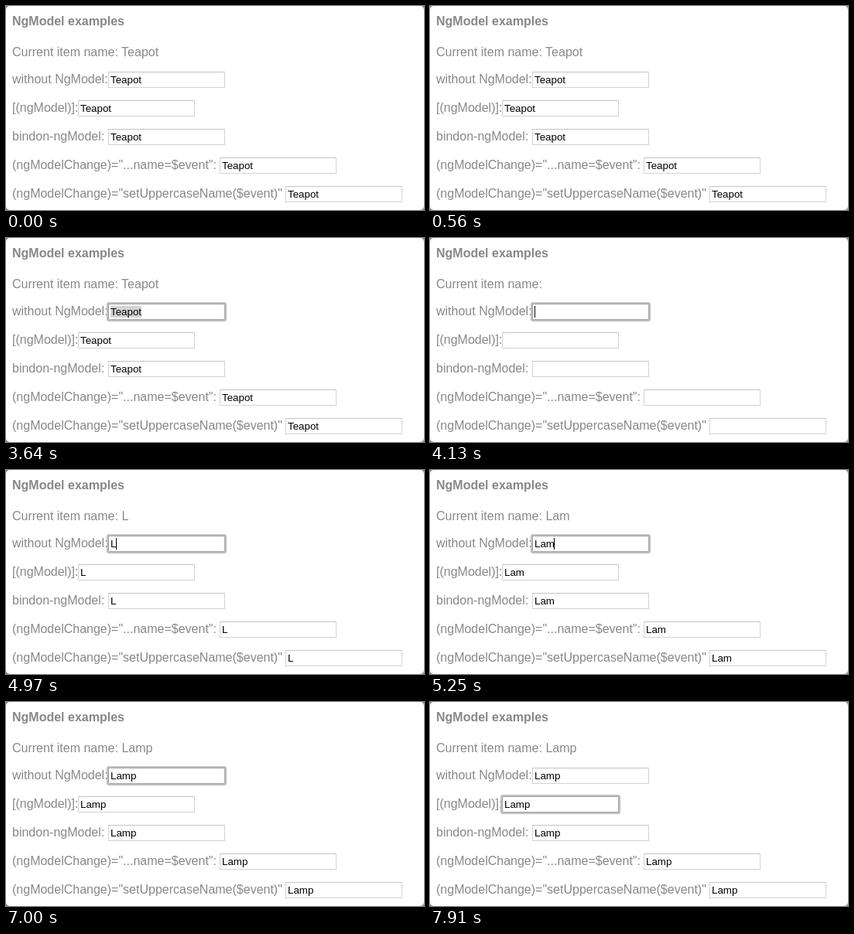
An HTML page that plays this animation: 540x264 px, repeating every 8000 ms.

```html
<!DOCTYPE html>
<html lang="en">
<head>
<meta charset="utf-8">
<title>NgModel examples</title>
<style>
html, body { margin: 0; height: 100%; overflow: hidden; background: #8a8a8a; }
#stage { position: relative; width: 540px; height: 264px; background: #fff; border-radius: 5px; }
#stage * { position: absolute; white-space: pre; }
.label { left: 8px; font: 16px/18px "Liberation Sans", Arial, sans-serif; color: #888; }
.title { font-weight: bold; }
.box { box-sizing: border-box; width: 151px; height: 21px; border: 1px solid #d2d2d2; border-top-color: #c4c4c4; background: #fff; }
.focus { border-color: #a6a6a6; box-shadow: 0 0 1px 2px #bdbdbd; border-radius: 1px; }
.value { left: 2px; top: 2px; font: 13.333px/15px "Liberation Sans", Arial, sans-serif; color: #000; }
.selected { background: #d4d4d4; }
.caret { top: 2px; width: 1px; height: 15px; background: #000; }
</style>
</head>
<body>
<div id="stage"></div>
<script>
const LOOP = 8000;
const stage = document.getElementById('stage');

// [label, left edge of its input]
const rows = [
  ['without NgModel:', 132],
  ['[(ngModel)]:', 93],
  ['bindon-ngModel:', 132],
  ['(ngModelChange)="...name=$event":', 276],
  ['(ngModelChange)="setUppercaseName($event)"', 361]
];

// [start time, value]
const values = [[0, 'Teapot'], [3990, ''], [4970, 'L'], [5110, 'La'], [5250, 'Lam'], [5460, 'Lamp']];
// [start time, focused row]
const focus = [[0, -1], [2450, 0], [7210, 1]];
// [start time, caret shown]
const blink = [[0, 0], [2450, 1], [2940, 0], [3500, 1], [3640, 0], [3990, 1], [4620, 0],
  [4970, 1], [5950, 0], [6510, 1], [7000, 0], [7210, 1], [7770, 0]];
const selection = [[0, 0], [3640, 1], [3990, 0]];

const at = (steps, t) => steps.filter(s => s[0] <= t).pop()[1];

function add(parent, cls, top, text = '') {
  const el = document.createElement('div');
  el.className = cls;
  if (top !== null) el.style.top = top + 'px';
  el.textContent = text;
  return parent.appendChild(el);
}

add(stage, 'label title', 11, 'NgModel examples');
const current = add(stage, 'label', 51);

const inputs = rows.map(([label, left], i) => {
  const y = 85 + 37 * i;
  add(stage, 'label', y + 1, label);
  const box = add(stage, 'box', y);
  box.style.left = left + 'px';
  return { box, value: add(box, 'value', null), caret: add(box, 'caret', null) };
});

function draw(now) {
  const t = now % LOOP;
  const name = at(values, t), active = at(focus, t);
  current.textContent = 'Current item name: ' + name;
  inputs.forEach(({ box, value, caret }, i) => {
    const on = i === active;
    box.classList.toggle('focus', on);
    value.textContent = name;
    value.classList.toggle('selected', on && at(selection, t) === 1);
    caret.hidden = !(on && at(blink, t));
    caret.style.left = 2 + Math.floor(value.getBoundingClientRect().width) + 'px';
  });
  requestAnimationFrame(draw);
}
requestAnimationFrame(draw);
</script>
</body>
</html>
```
